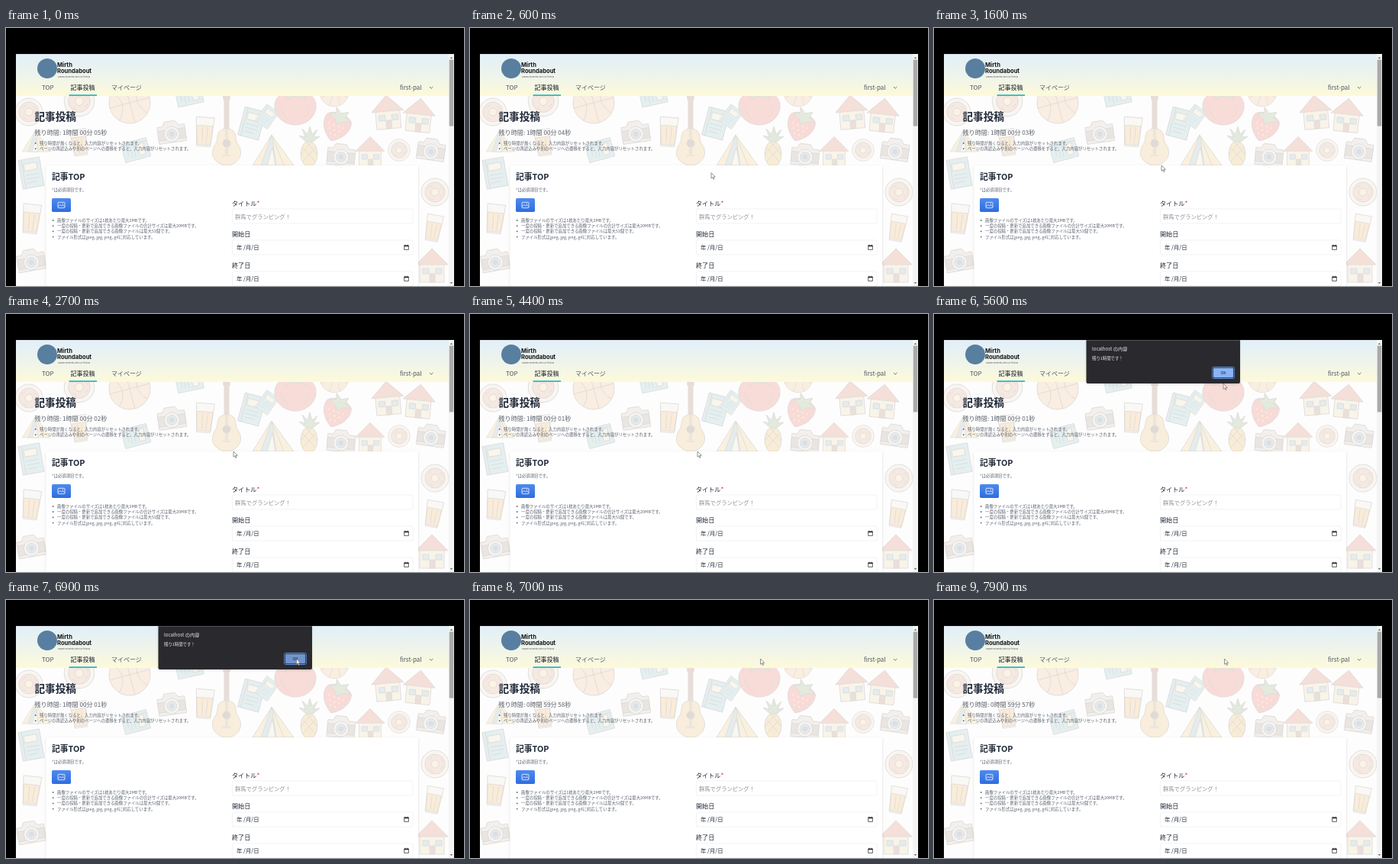
Animation, 600 px wide and 338 px high, one loop 8 s. Source, as an HTML page:

```html
<!DOCTYPE html>
<html lang="ja">
<head>
<meta charset="utf-8">
<title>記事投稿</title>
<style>
  html, body { margin: 0; width: 100%; height: 100%; overflow: hidden; background: #000; }
  svg { display: block; width: 100vw; height: 100vh; font-family: "Noto Sans CJK JP", "Noto Sans CJK", "Noto Sans", sans-serif; }
  text { white-space: pre; }
  .nav { font-size: 8px; fill: #4b5563; }
  .label { font-size: 8.1px; font-weight: 500; fill: #1f2937; }
  .small { font-size: 5.4px; fill: #5a626e; }
  .date { font-size: 7.4px; fill: #1f2937; }
  .field { fill: #fff; stroke: #eceef1; stroke-width: .7; }
  .brand { font: 700 7.6px Inter, sans-serif; fill: #151515; }
  .tagline { font: 2.7px Inter, sans-serif; fill: #555; }
</style>
</head>
<body>
<svg viewBox="0 0 600 338" preserveAspectRatio="none">
  <defs>
    <linearGradient id="sky" x2="0" y2="1">
      <stop stop-color="#e1eff9"/><stop offset=".5" stop-color="#eef4ec"/><stop offset="1" stop-color="#fdfada"/>
    </linearGradient>
    <linearGradient id="blue" x2="0" y2="1">
      <stop stop-color="#4d8bf0"/><stop offset="1" stop-color="#2f6cdc"/>
    </linearGradient>
    <filter id="shadow" x="-10%" y="-10%" width="120%" height="130%">
      <feDropShadow dx="0" dy="1" stdDeviation="1.5" flood-opacity=".14"/>
    </filter>
    <clipPath id="page"><path d="M13 34.300H587V338H13z"/></clipPath>

    <g id="camera">
      <path fill="#c9c3b4" d="M-18-9h7l3-6h14l4 6h8v22h-36z"/>
      <path fill="#a2957f" d="M-18-4h36v13h-36z"/>
      <circle r="10" cy="2" fill="#d9d9d4"/><circle r="6.5" cy="2" fill="#8facba"/><circle r="3" cy="2" fill="#6a7f8d"/>
    </g>
    <g id="glass">
      <path fill="#eee9db" d="M-12-19h24l-3 38h-18z"/>
      <path fill="#edb55d" d="M-10.500-8h21l-2 25h-17z"/><path d="M-3-6l1 21M4-6l-1 21"/>
    </g>
    <g id="guitar">
      <path fill="#b5735c" d="M-3-48h6v62h-6z"/><path fill="#aa6a57" d="M-5-61h10l-1 13h-8z"/>
      <path fill="#e7b96d" d="M-10-6c5-6 15-6 20 0c4 8 0 10 6 18c8 14-4 26-16 26s-24-12-16-26c6-8 2-10 6-18z"/>
      <circle r="5" cy="9" fill="#7d6455"/><path d="M-6 25H6M-1-45V24M1-45V24"/>
    </g>
    <g id="book">
      <path fill="#8dbfc4" d="M-14-19h28v38h-28z"/><path fill="#e9dfbd" d="M-8-13h17v9H-8z"/>
      <path d="M-10-19v38M-7 2H10M-7 7H10M-7 12H6"/>
    </g>
    <g id="tomato">
      <path fill="#e56e5b" d="M0-15c16-9 28 1 27 15s-14 23-27 23s-26-9-27-23s11-24 27-15z"/>
      <path fill="#8fa96c" d="M0-15l-13 5 8-9-5-6 10 4 9-5-3 8 9 7z"/>
      <path fill="none" d="M-19-2q3 14 12 19M18 2q-2 9-9 14"/>
    </g>
    <g id="berry">
      <path fill="#e4695b" d="M-17-10c5-9 29-9 34 0c4 13-7 26-17 31c-10-5-21-18-17-31z"/>
      <path fill="#8eae72" d="M-15-12l9-3-2-8 8 6 9-5-2 8 9 4-10 2-6 6-6-7z"/>
      <path stroke="#f5d48b" stroke-width="2" stroke-dasharray="1.500 5" d="M-11 0H13M-8 6H11M-5 12H7"/>
    </g>
    <g id="tent">
      <path fill="#e8cb79" d="M-27 20L-2-20 27 20z"/><path fill="#8fb5b9" d="M-16 20L-2-20 4 20z"/>
      <path fill="#e9e2cc" d="M-8 20l7-24 4 24z"/><path d="M-2-20L14 20"/>
    </g>
    <g id="pineapple">
      <ellipse rx="11" ry="17" cy="8" fill="#e5b456"/>
      <path fill="none" d="M-9-1L8 18M-3-7L11 9M9-1L-8 18M3-7L-11 9"/>
      <path fill="#85a878" d="M-4-8l-9-8 8 2-4-11 7 7 3-10 3 10 7-6-5 10 8-1-9 7z"/>
    </g>
    <g id="house">
      <path fill="#ead5a5" d="M-16-3h32v24h-32z"/><path fill="#d87d62" d="M-21-2L0-23 21-2z"/>
      <path fill="#89b4c2" d="M-12 3h8v7h-8zM5 3h8v7H5z"/><path fill="#a77f60" d="M-3 10h7v11h-7z"/>
    </g>
    <g id="ball">
      <circle r="27" fill="#e9bd85"/>
      <path fill="none" d="M-27 0H27M0-27V27M-19-19q18 19 0 38M19-19q-18 19 0 38"/>
    </g>
    <g id="dish">
      <circle r="18" fill="#e8ddca"/><circle r="13" fill="#d9a585"/><circle r="5" fill="#f2d392"/>
      <path fill="none" d="M-9-5l5-4M7-7l4 4M-8 7l5 3M7 7l3-4"/>
    </g>
  </defs>

  <g clip-path="url(#page)">
    <path fill="#fefdfd" d="M13 34H587V338H13z"/>
    <g id="pattern" opacity=".23" stroke="#77716b" stroke-width=".9"></g>
    <path fill="url(#sky)" d="M13 34H580V89H13z"/>

    <circle cx="54" cy="53" r="13" fill="#587f9f"/>
    <text class="brand" x="67" y="50.500">Mirth</text>
    <text class="brand" x="67" y="58.500">Roundabout</text>
    <text class="tagline" x="68" y="64.700">Shared moments with our friends</text>

    <text class="nav" x="47" y="81">TOP</text>
    <text class="nav" x="84.500" y="81" style="fill:#111827;font-weight:500">記事投稿</text>
    <text class="nav" x="138" y="81">マイページ</text>
    <text class="nav" x="516" y="81">first-pal</text>
    <path d="M555 77l2.200 2.200 2.200-2.200" fill="none" stroke="#4b5563" stroke-width=".8"/>
    <path fill="#22b8d2" d="M82.500 87.300h36.500v1.700H82.500z"/>

    <text x="37.500" y="121" font-size="13.600" font-weight="700" fill="#1f2937">記事投稿</text>
    <text id="timer" x="37.500" y="140" font-size="8.100" font-weight="500" fill="#5a626e"></text>
    <g id="notes"></g>

    <rect x="52.500" y="180" width="487.500" height="170" rx="2" fill="#fff" fill-opacity=".97" filter="url(#shadow)"/>
    <text x="60" y="199" font-size="10.800" font-weight="700" fill="#1f2937">記事TOP</text>
    <text class="small" x="60" y="214.200">*は必須項目です。</text>
    <rect x="60" y="223" width="25" height="18" rx="1.800" fill="url(#blue)"/>
    <g fill="none" stroke="#fff" stroke-width=".8">
      <rect x="68" y="228.300" width="9" height="7.400" rx="1"/>
      <path d="M68.300 234l2.500-2.600 2 1.800 1.700-1.300 2.300 2.300"/><circle cx="74.300" cy="230.400" r=".3"/>
    </g>

    <text class="label" x="296" y="232.500">タイトル<tspan fill="#dc2626">*</tspan></text>
    <rect class="field" x="296.500" y="237" width="236.500" height="19" rx="1"/>
    <text x="300" y="249.500" font-size="7.300" fill="#8b919b">群馬でグランピング！</text>
    <g id="dates"></g>

    <path fill="#f4f4f4" d="M580 34h7v304h-7z"/>
    <path fill="#aaa" d="M580.700 41.500h5.600v87h-5.600z"/>
    <path fill="#777" d="M581.700 40l1.800-2.300 1.800 2.300zM581.700 333l1.800 2.300 1.800-2.300z"/>
  </g>

  <g id="dialog">
    <path d="M199.500 34.300h201.500v54.700q0 2-2 2H201.500q-2 0-2-2z" fill="#292a2d" filter="url(#shadow)"/>
    <text x="207" y="47.500" font-size="6.200" fill="#e8eaed">localhost の内容</text>
    <text x="207" y="60" font-size="5.400" fill="#e8eaed">残り1時間です！</text>
    <rect x="364.700" y="69.500" width="28.600" height="15" rx="1.800" fill="none" stroke="#5e8ad4"/>
    <rect id="ok" x="366" y="70.700" width="26" height="12.600" rx="1.200"/>
    <text x="379" y="79" font-size="5.200" text-anchor="middle" fill="#202124">OK</text>
  </g>
  <path id="cursor" d="M0 0v7.300l1.700-1.500 1.200 2.700 1.200-.500-1.200-2.600h2.300z" fill="#fff" stroke="#666" stroke-width=".7"/>
</svg>
<script>
const LOOP = 8000;
const byId = id => document.getElementById(id);

// name, x, y, scale, rotation
const scatter = `dish 96 96 1.1 0|ball 162 98 1 -15|book 240 88 .9 78|camera 217 137 1 -8|glass 260 136 1 4
guitar 289 142 1 0|book 322 125 1 15|book 342 116 .7 35|tomato 379 104 1 0|berry 433 128 1 20
tent 350 160 1 0|pineapple 397 157 1 0|camera 439 167 1 5|house 477 163 .9 0|house 500 111 1 -5
house 541 115 1 6|dish 30 110 1 0|glass 96 150 .9 -8|book 170 160 .9 75|ball 430 84 .7 20
dish 515 160 .8 0|camera 557 160 1 8|book 33 190 1 -10|dish 562 215 1 0|glass 33 250 1 6
camera 33 305 1 -10|glass 560 262 .9 10|house 558 312 1 0|tent 40 148 .7 0`.split(/[|\n]/);
byId("pattern").innerHTML = scatter.map(item => {
  const [name, x, y, scale, angle] = item.split(" ");
  return `<use href="#${name}" transform="translate(${x} ${y}) rotate(${angle}) scale(${scale})"/>`;
}).join("");

const bullets = (lines, x, y, step) => lines.map((line, i) =>
  `<circle cx="${x - 5.3}" cy="${y + i * step - 2}" r=".9" fill="#5a626e"/>
   <text class="small" x="${x}" y="${y + i * step}">${line}</text>`).join("");
byId("notes").innerHTML = bullets([
  "残り時間が無くなると、入力内容がリセットされます。",
  "ページの再読込みや別のページへの遷移をすると、入力内容がリセットされます。"
], 44, 153, 7.2);

const dateField = (label, y) => `<text class="label" x="296" y="${y}">${label}</text>
  <rect class="field" x="296.5" y="${y + 5.5}" width="236.500" height="19" rx="1"/>
  <text class="date" x="302" y="${y + 17.7}">年 /月/日</text>
  <g transform="translate(521.3 ${y + 11.2})" stroke="#222" fill="none" stroke-width=".7">
    <path d="M.4 1.200h5.700v5.500H.4zM1.600 0v1.500M4.900 0v1.500"/><path d="M.4 1.900h5.700" stroke-width="1.300"/>
  </g>`;
byId("dates").innerHTML = bullets([
  "画像ファイルのサイズは1枚あたり最大2MBです。",
  "一度の投稿・更新で追加できる画像ファイルの合計サイズは最大20MBです。",
  "一度の投稿・更新で追加できる画像ファイルは最大51個です。",
  "ファイル形式はjpeg, jpg, png, gifに対応しています。"
], 67, 254, 7.2) + dateField("開始日", 272.5) + dateField("終了日", 313.5);

const clamp = v => Math.max(0, Math.min(1, v));
const ease = v => v * v * (3 - 2 * v);

// time, x, y of the pointer tip
const path = [[50, 586, 334], [700, 298, 180], [5200, 298, 180], [5600, 379, 91], [6100, 380.5, 77], [LOOP, 380.5, 77]];
function pointerAt(t) {
  const i = Math.max(1, path.findIndex(p => t <= p[0]));
  const [a, b] = [path[i - 1], path[i]];
  const k = ease(clamp((t - a[0]) / (b[0] - a[0])));
  return [a[1] + (b[1] - a[1]) * k, a[2] + (b[2] - a[2]) * k];
}

function remaining(t) {
  if (t >= 7000) return `0時間 59分 ${t < 7600 ? 58 : 57}秒`;
  const seconds = Math.max(1, 5 - Math.floor((t + 400) / 1000));
  return `1時間 00分 0${seconds}秒`;
}

function draw(now) {
  const t = now % LOOP;
  byId("timer").textContent = "残り時間: " + remaining(t);
  byId("dialog").setAttribute("opacity", t < 7000 ? clamp((t - 4550) / 200) : 0);
  byId("ok").setAttribute("fill", t >= 6900 ? "#7194cd" : t >= 5900 ? "#7fa6e6" : "#8ab4f8");
  byId("cursor").setAttribute("transform", `translate(${pointerAt(t)})`);
  byId("cursor").setAttribute("opacity", t < 100 ? 0 : 1);
  requestAnimationFrame(draw);
}
requestAnimationFrame(draw);
</script>
</body>
</html>
```
